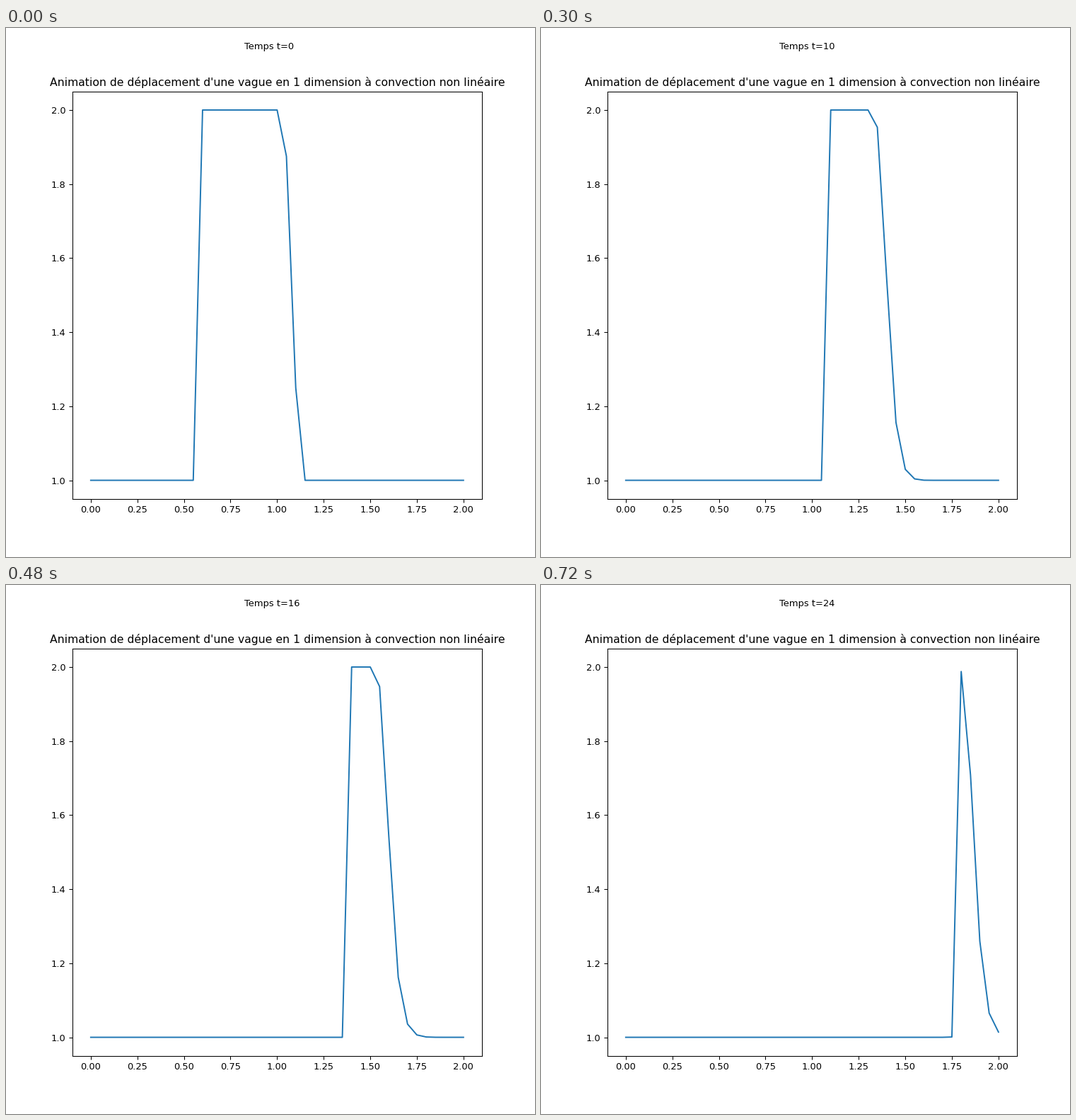
Write a matplotlib script that moves like this. It is 748 px wide and 748 px high and loops after 0.75 s.

```python
import matplotlib.pyplot as plt
import numpy as np
from matplotlib.animation import FuncAnimation

INCHES, DPI = 8, 93.5  # 748 x 748 pixels
FRAMES, INTERVAL = 25, 30
NX, LENGTH, DT = 41, 2.0, 0.025
DX = LENGTH / (NX - 1)
LEAD_STEPS = 2  # steps already taken when the first frame is shown

plt.rcParams["font.family"] = "DejaVu Sans"


def step(u):
    """Advance du/dt + u du/dx = 0 by one upwind step."""
    new = u.copy()
    new[1:] -= u[1:] * DT / DX * (u[1:] - u[:-1])
    return new


def solve():
    u = np.ones(NX)
    u[10:21] = 2  # square pulse on 0.5 <= x <= 1
    states = [u]
    for _ in range(LEAD_STEPS + FRAMES - 1):
        states.append(step(states[-1]))
    return states[LEAD_STEPS:]


x = np.linspace(0, LENGTH, NX)
waves = solve()

fig, ax = plt.subplots(figsize=(INCHES, INCHES), dpi=DPI)
ax.set_title("Animation de déplacement d'une vague en 1 dimension "
             "à convection non linéaire")
ax.set_xlim(-0.1, 2.1)
ax.set_ylim(0.95, 2.05)
line, = ax.plot(x, waves[0], color="C0", lw=1.5)
clock = fig.text(0.45, 0.96, "Temps t=0", fontsize=10)


def draw(frame):
    line.set_ydata(waves[frame])
    clock.set_text(f"Temps t={frame}")
    return line, clock


anim = FuncAnimation(fig, draw, frames=FRAMES, interval=INTERVAL,
                     repeat=True, repeat_delay=0)
plt.show()
```
